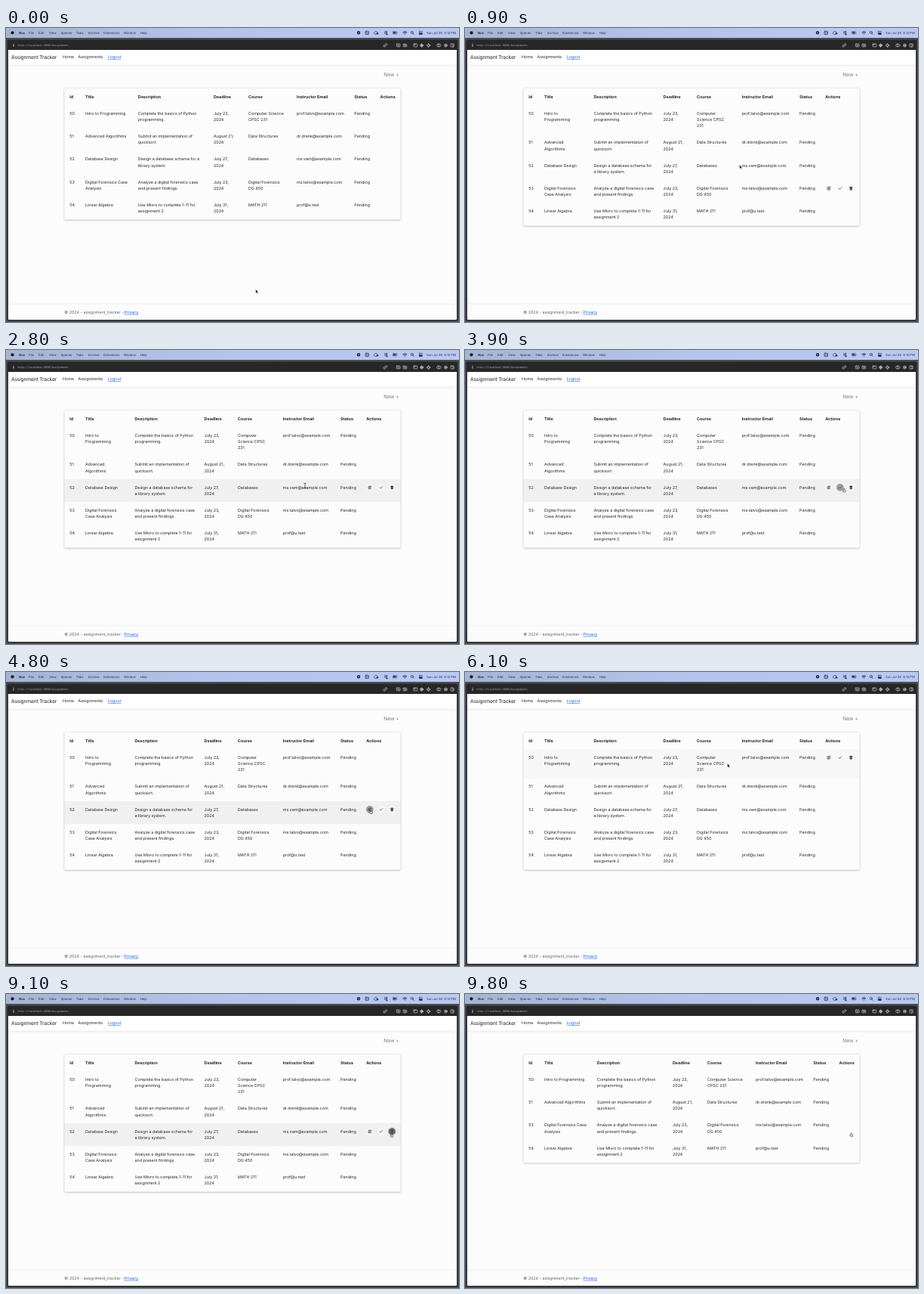
An HTML page that plays this animation: 600 by 389 pixels, repeating every 9.9 s.

```html
<!DOCTYPE html>
<html lang="en">
<head>
<meta charset="utf-8">
<title>Assignment Tracker</title>
<style>
html, body { margin: 0; width: 100%; height: 100%; overflow: hidden; background: #fcfcfc; }
svg { display: block; width: 100%; height: 100%; }
text { font: 400 5.4px Inter, sans-serif; letter-spacing: -.004em; fill: #212529; white-space: pre; text-rendering: geometricPrecision; }
.head { font-weight: 650; }
.brand { font-size: 6.75px; letter-spacing: -.03em; }
.new { font-size: 6.75px; fill: #777d83; letter-spacing: -.015em; }
.muted { fill: #5f666d; }
.link { fill: #1a66e0; text-decoration: underline; }
.menu { font-size: 4.2px; fill: #28304a; }
.url { font: 3.4px "DejaVu Sans Mono", monospace; letter-spacing: 0; fill: #b9b9b9; }
.line { fill: none; stroke-width: .7; stroke-linecap: round; stroke-linejoin: round; }
</style>
</head>
<body>
<svg id="stage" viewBox="0 0 600 389" preserveAspectRatio="none">
  <defs>
    <linearGradient id="sky"><stop stop-color="#a5b4d2"/><stop offset=".5" stop-color="#b5c4ec"/><stop offset="1" stop-color="#bac9f2"/></linearGradient>
    <filter id="shadow" x="-5%" y="-5%" width="110%" height="115%">
      <feDropShadow dx="0" dy=".8" stdDeviation="1.2" flood-color="#000" flood-opacity=".25"/>
    </filter>
    <filter id="navShadow" x="0" y="-10%" width="100%" height="150%">
      <feDropShadow dx="0" dy=".6" stdDeviation=".8" flood-color="#000" flood-opacity=".13"/>
    </filter>
  </defs>

  <rect width="600" height="389" fill="#4b4d50"/>
  <rect width="600" height="13" fill="url(#sky)"/>
  <rect x="1" y="15" width="598" height="373" rx="3" fill="#373839"/>
  <rect x="2" y="16" width="596" height="14" rx="2" fill="#272728"/>
  <rect x="3" y="29" width="594" height="357" rx="1.5" fill="#fcfcfc"/>
  <rect x="3" y="29" width="594" height="19.5" fill="#fff" filter="url(#navShadow)"/>
  <path d="M3 365H597" stroke="#dfe2e5" stroke-width=".5"/>

  <g id="menus"><circle cx="8.5" cy="6.3" r="2.1" fill="#15171f"/></g>

  <g class="line" stroke="#20263a">
    <circle cx="467" cy="6.3" r="1.5" stroke-width="1.5"/>
    <rect x="476" y="4.2" width="4.4" height="4.4" rx=".8"/>
    <path d="M477.2 7.4V5.4L479.2 7.4V5.4" stroke-width=".5"/>
    <path d="M488 7.8a1.4 1.4 0 0 1 .4-2.5a2 2 0 0 1 3.5 .4M489 8.2h1.6"/>
    <rect x="490.8" y="6.3" width="2.4" height="2" fill="#20263a" stroke="none"/>
    <path d="M501.4 6.4L504.6 4V8.8ZM501.4 4l4 4.8"/>
    <rect x="512.3" y="4.7" width="5.6" height="3.2" rx=".9" stroke-width=".5"/>
    <rect x="513" y="5.4" width="3.6" height="1.8" fill="#20263a" stroke="none"/>
    <path d="M525.8 5.6a3.6 3.6 0 0 1 5 0M526.8 6.8a2.1 2.1 0 0 1 3 0M528.3 8.1v.1" stroke-width=".9"/>
    <circle cx="537.7" cy="5.9" r="1.5"/><path d="M538.9 7.1L540.2 8.5"/>
    <rect x="547" y="4.3" width="4.6" height="1.7" rx=".85" stroke-width=".5"/>
    <rect x="547" y="6.8" width="4.6" height="1.7" rx=".85" fill="#20263a" stroke-width=".5"/>
  </g>

  <g class="line" stroke="#c4c4c4" stroke-width=".6">
    <path d="M10 22.4v2M10 21v.1" stroke-width="1"/>
    <path d="M501.6 23.8l1.6-1.8M501.8 21.8l.8-.8a1.2 1.2 0 0 1 1.8 1.8l-.8.8M502.8 24l-.8.8a1.2 1.2 0 0 1-1.8-1.8l.8-.8"/>
    <rect x="517.2" y="21" width="4.8" height="3.8" rx=".6"/><path d="M519 22.2h1.4M519 23.5h1.4"/>
    <rect x="526" y="21.2" width="4.8" height="3.6" rx=".7"/><circle cx="528.4" cy="23" r=".9"/>
    <rect x="540" y="21" width="4.8" height="3.8" rx=".6"/><path d="M540 22.1h2.4v-1"/>
    <circle cx="550.6" cy="23" r="1.7" fill="#777"/><path d="M550.6 20.7v4.6M548.3 23h4.6"/>
    <circle cx="559.6" cy="23" r="1.7"/><path d="M559.6 20.5v1.4M559.6 24.1v1.4M557.1 23h1.4M560.7 23h1.4"/>
    <rect x="570.6" y="21.3" width="5.4" height="3.3" rx="1.6"/><path d="M573.3 20.8v4.3"/>
    <circle cx="582.4" cy="23" r="2"/><circle cx="582.4" cy="23" r=".8" fill="#c4c4c4"/>
    <rect x="589.1" y="21" width="4.2" height="4" rx=".6"/><path d="M591.8 21v4"/>
  </g>
  <text class="url" x="15.5" y="23.9">http://localhost:5050/Assignments</text>

  <text class="brand" x="7" y="41.1">Assignment Tracker</text>
  <text x="75" y="40.4">Home</text>
  <text x="95.5" y="40.4">Assignments</text>
  <text class="link" x="134.8" y="40.4">Logout</text>
  <text class="new" x="500.3" y="64">New +</text>
  <text class="muted" x="77.3" y="377.8">© 2024 - assignment_tracker - </text>
  <text class="link" x="156.5" y="377.8">Privacy</text>

  <g id="tables"></g>
  <g id="cursor">
    <path id="arrow" d="M0 0V5.2L1.2 4.2L2 6L2.9 5.6L2.1 3.8H3.7Z" fill="#111" stroke="#fff" stroke-width=".45"/>
    <path id="beam" class="line" d="M-1.3-3.2Q0-3.2 0-2.4Q0-3.2 1.3-3.2M0-2.4V2.6M-1.3 3.3Q0 3.3 0 2.6Q0 3.3 1.3 3.3" stroke="#333"/>
    <path id="hand" d="M-.5-.1Q0-.8.5-.1V1.6L2 2Q2.5 2.2 2.3 3L1.9 4.7H-.7L-1.9 3Q-1.9 2.2-1.2 2.5L-.5 3.1Z" fill="#ddd" stroke="#333" stroke-width=".5"/>
  </g>
</svg>
<script>
const $ = id => document.getElementById(id);
const LOOP = 9900, STEP = 100, LINE = 8.2, TOP = 102.2;

function add(parent, tag, attrs, content = '') {
  const el = document.createElementNS('http://www.w3.org/2000/svg', tag);
  for (const key in attrs) el.setAttribute(key, attrs[key]);
  el.textContent = content;
  return parent.appendChild(el);
}

const menus = [['Nuv', 17], ['File', 30], ['Edit', 43], ['View', 57], ['Spaces', 72.7], ['Tabs', 93],
  ['Archive', 108.7], ['Extensions', 129], ['Window', 156], ['Help', 177.7], ['Sun Jul 28  8:13 PM', 557]];
menus.forEach(([label, x], i) =>
  add($('menus'), 'text', { class: 'menu', x, y: 7.9, style: i ? '' : 'font-weight:700' }, label));

// Line breaks: "/" always, "|" only with narrow columns, "~" only with wide ones.
const heads = ['Id', 'Title', 'Description', 'Deadline', 'Course', 'Instructor Email', 'Status', 'Actions'];
const rows = [
  ['50', 'Intro to|Programming', 'Complete the basics of Python/programming.', 'July 23,/2024', 'Computer|Science~CPSC|231', 'prof.talvo@example.com'],
  ['51', 'Advanced|Algorithms', 'Submit an implementation of/quicksort.', 'August 21,/2024', 'Data Structures', 'dr.drenk@example.com'],
  ['52', 'Database Design', 'Design a database schema for|a~library system.', 'July 27,/2024', 'Databases', 'ms.vam@example.com'],
  ['53', 'Digital Forensics|Case~Analysis', 'Analyze a digital forensics case/and present findings.', 'July 23,/2024', 'Digital Forensics/DG 450', 'ms.talvo@example.com'],
  ['54', 'Linear Algebra', 'Use Mivro to complete 1-11 for/assignment 2', 'July 31,/2024', 'MATH 211', 'prof@u.test'],
].map(row => [...row, 'Pending']);
const wideCols = [84.3, 105, 174.8, 275, 321, 385, 461.3, 495.6];
const narrowCols = [84.3, 105, 170.5, 262.6, 307, 366.7, 443, 477.2];
const buttonXs = [481.8, 496.8, 511.2];
const icons = [
  'M.4-1.7H-1.2Q-1.8-1.7-1.8-1.1V1.3Q-1.8 1.9-1.2 1.9H1.1Q1.7 1.9 1.7 1.3V.2M-.6.7L-.4-.3L1.6-2.2L2.2-1.6L.3.4Z',
  'M-1.8.1L-.6 1.3L1.9-1.3',
  'M-1.7-1.5H1.7M-.6-1.6V-2H.6V-1.6M-1.3-1L-1.1 2H1.1L1.3-1Z',
];

function wrap(text, narrow) {
  return narrow ? text.replace(/~/g, ' ').split(/[|/]/) : text.replace(/\|/g, ' ').split(/[~/]/);
}

function addButtons(parent, y) {
  const group = add(parent, 'g', {});
  const glows = buttonXs.map((x, i) => {
    const button = add(group, 'g', { transform: `translate(${x} ${y})` });
    add(button, 'circle', { r: 4.9, fill: '#f7f7f7' });
    const glow = add(button, 'circle', { r: 4.9, fill: '#6c7176' });
    add(button, 'path', { class: 'line', d: icons[i], stroke: '#333', style: i === 2 ? 'fill:#666' : '' });
    return glow;
  });
  return { group, glows };
}

function buildTable(data, cols, narrow) {
  const group = add($('tables'), 'g', {});
  const card = add(group, 'rect', { x: 77.3, y: 79.6, width: 445.4, rx: 2, fill: '#fcfcfc', stroke: '#dcdcdc', 'stroke-width': .4, filter: 'url(#shadow)' });
  heads.forEach((label, i) => add(group, 'text', { class: 'head', x: cols[i], y: 92.6 }, label));
  let y = TOP;
  const parts = data.map(row => {
    const cells = row.map(text => wrap(text, narrow));
    const height = 30.25 + LINE * (Math.max(...cells.map(c => c.length)) - 2);
    const shade = add(group, 'rect', { x: 77.3, y, width: 445.4, height, fill: '#000', opacity: 0 });
    cells.forEach((lines, col) => lines.forEach((line, i) =>
      add(group, 'text', { x: cols[col], y: y + 12.7 + LINE * i }, line)));
    const part = { shade, y: y + 11, ...(narrow && addButtons(group, y + 11)) };
    y += height;
    return part;
  });
  card.setAttribute('height', y - 79.6);
  return { group, parts };
}

const tables = {
  wide: buildTable(rows, wideCols, false),
  narrow: buildTable(rows, narrowCols, true),
  removed: buildTable(rows.filter(row => row[0] !== '52'), wideCols, false),
};

// time, x, y
const path = [
  [0, 330.8, 345.8], [600, 330.8, 345.8], [700, 336, 318], [800, 352, 236], [900, 363.6, 181], [1200, 388, 178],
  [1600, 396, 179.3], [2800, 396, 179.3], [3700, 497, 183], [4200, 511, 184], [4800, 483.2, 182.8],
  [5300, 483.2, 182.8], [6100, 347.6, 121], [6300, 347.6, 121], [7000, 415, 120], [7100, 415, 120],
  [7800, 509.5, 115], [8100, 509.5, 115], [8400, 511.5, 181], [9000, 510.5, 185], [9400, 511.5, 184], [LOOP, 511.5, 184],
];
// time, hovered row
const hovers = [[800, 4], [900, 3], [1000, 2], [5500, 1], [5800, 0], [8300, 1], [8400, 2], [9800, -1]];

function cursorAt(t) {
  const i = path.findIndex(p => p[0] > t);
  const [t0, x0, y0] = path[i - 1], [t1, x1, y1] = path[i];
  const k = (t - t0) / (t1 - t0), e = k * k * (3 - 2 * k);
  return [x0 + (x1 - x0) * e, y0 + (y1 - y0) * e];
}

function shadeAt(row, t) {
  let shade = 0;
  for (let i = 0; i < hovers.length - 1; i++) {
    const [start, hovered] = hovers[i], end = hovers[i + 1][0];
    if (hovered !== row || t < start) continue;
    const reached = Math.min(1, (Math.min(t, end) - start - 100) / 500);
    shade += Math.max(0, reached - Math.max(0, t - end) / 300);
  }
  return Math.min(1, shade);
}

// Share of the last three steps that the cursor spent over a button.
function glowAt(buttonX, buttonY, t) {
  const over = [0, 1, 2].filter(back => {
    const [x, y] = cursorAt(Math.max(0, t - back * STEP));
    return Math.abs(x - buttonX) < 5 && Math.abs(y - buttonY) < 6;
  });
  return over.length / 3;
}

const show = (el, on) => { el.style.display = on ? '' : 'none'; };

function draw(now) {
  const t = Math.floor(now % LOOP / STEP) * STEP;
  const [x, y] = cursorAt(t);
  const current = t < 800 ? 'wide' : t < 9800 ? 'narrow' : 'removed';
  for (const name in tables) show(tables[name].group, name === current);

  const active = hovers.reduce((row, [time, next]) => t >= time ? next : row, -1);
  tables.narrow.parts.forEach((part, row) => {
    part.shade.setAttribute('opacity', .047 * shadeAt(row, t));
    show(part.group, row === active);
    part.glows.forEach((glow, i) => glow.setAttribute('opacity', glowAt(buttonXs[i], part.y, t)));
  });

  const hand = buttonXs.some(bx => Math.abs(x - bx) < 5.5);
  const beam = t >= 1200 && t < 3000;
  show($('hand'), hand);
  show($('beam'), beam);
  show($('arrow'), !hand && !beam);
  $('cursor').setAttribute('transform', `translate(${x} ${y})`);
}

const start = performance.now();
(function tick() {
  draw(performance.now() - start);
  requestAnimationFrame(tick);
})();
</script>
</body>
</html>
```
